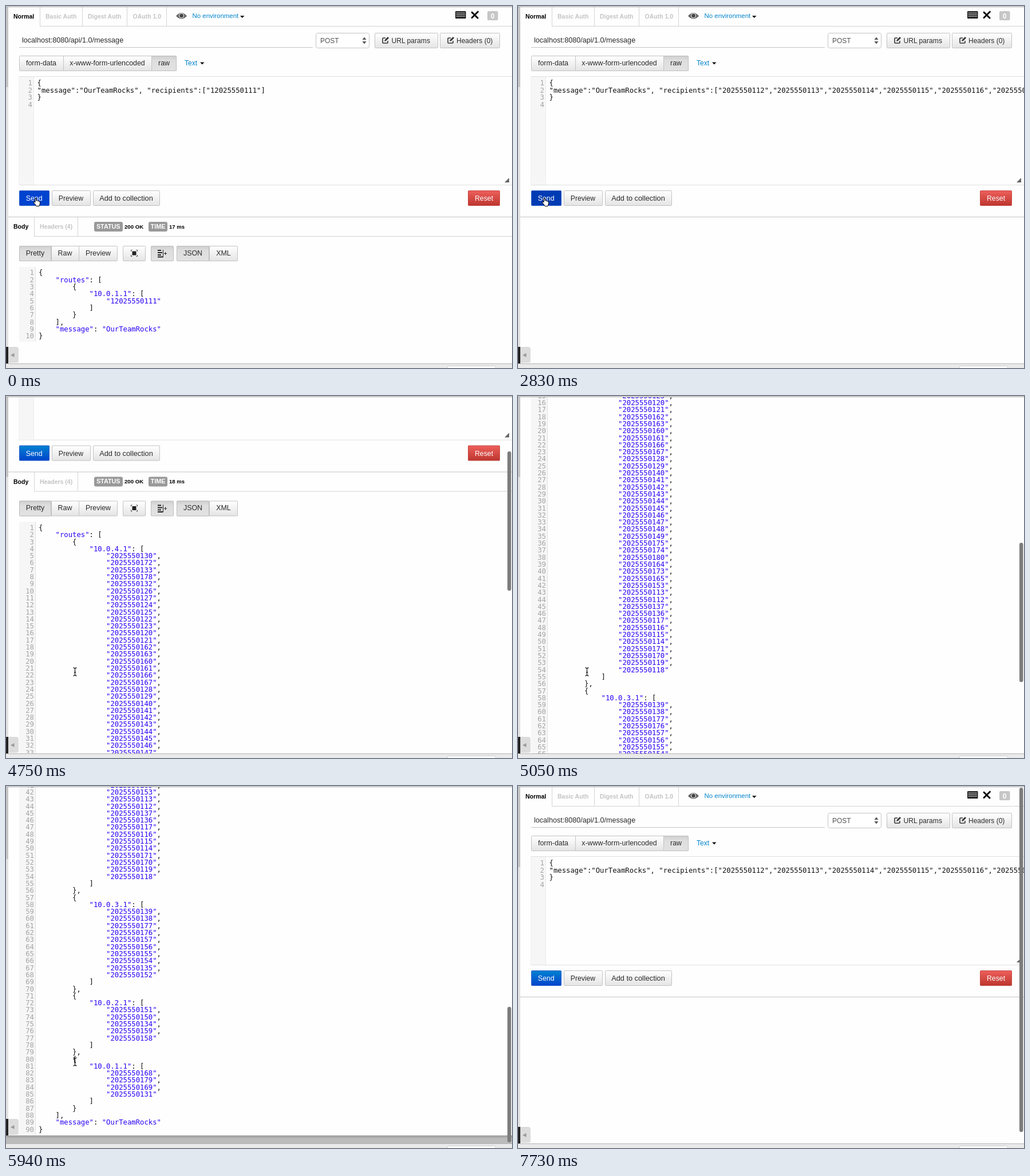
Write an HTML page that moves like this. It is 884 px wide and 634 px high and loops after 8000 ms.

```html
<!DOCTYPE html>
<html lang="en">
<head>
<meta charset="utf-8">
<title>API client</title>
<style>
html, body { margin: 0; width: 100%; height: 100%; overflow: hidden; background: #fff; }
svg { display: block; width: 884px; height: 634px; }
text { font-family: "Liberation Sans", Arial, sans-serif; font-size: 12.4px; fill: #2b2b2b; }
.bold { font-weight: bold; font-size: 10.5px; fill: #000; }
.off { fill: #c4c4c4; }
.link { fill: #0084cc; }
.white { fill: #fff; }
.code { font-family: "DejaVu Sans Mono", monospace; font-size: 12.25px; fill: #111; white-space: pre; }
.num { fill: #a5a5a5; text-anchor: end; }
.str { fill: #2a00f5; }
.mid { text-anchor: middle; }
</style>
</head>
<body>
<svg viewBox="0 0 884 634">
  <defs>
    <linearGradient id="plain" x2="0" y2="1"><stop stop-color="#fff"/><stop offset="1" stop-color="#e4e4e4"/></linearGradient>
    <linearGradient id="down" x2="0" y2="1"><stop stop-color="#cfcfcf"/><stop offset=".3" stop-color="#dedede"/><stop offset="1" stop-color="#e2e2e2"/></linearGradient>
    <linearGradient id="blue" x2="0" y2="1"><stop stop-color="#0082d2"/><stop offset="1" stop-color="#0044cc"/></linearGradient>
    <linearGradient id="red" x2="0" y2="1"><stop stop-color="#ee5f5b"/><stop offset="1" stop-color="#bd362f"/></linearGradient>
    <linearGradient id="under" x2="0" y2="1"><stop stop-color="#999"/><stop offset=".4" stop-color="#bbb"/></linearGradient>
    <clipPath id="clip"><rect y="2" width="884" height="624"/></clipPath>
  </defs>
  <rect width="884" height="634" fill="#eaeaea"/>
  <rect y="1" width="884" height="1" fill="#a6a6a6"/>
  <g clip-path="url(#clip)">
    <rect id="strip" width="884" height="14" fill="url(#under)"/>
    <g id="frame">
      <rect y="2" width="884" height="624" fill="#fefefe"/>
      <g id="page"></g>
      <path d="M0 2h4v624H0z" fill="#e2e2e2"/>
      <path d="M0 2h4v140H0z" fill="#c6c6c6"/>
      <path d="M0 597h4v29H0z" fill="#222"/>
      <path d="M4 597h14q4 0 4 4v20q0 4-4 4H4z" fill="#dcdcdc"/>
      <path d="M8 611.5l6.500-3.500v7z" fill="#999"/>
    </g>
    <rect id="bar" x="876" width="6.500" rx="3.250" fill="#7c7c7c"/>
    <path id="hand" d="M4 9V2q1-1.600 2 0V6q2-1 2.500.5q2-.6 2.300.8q1.700-.3 1.700 1.500V11L11 15.500H6L4.500 13L1 9q0-1.500 1.500-1z" fill="#fff" stroke="#000"/>
    <path id="beam" d="M-3-7q3 0 3 2q0-2 3-2M0-5V5M-3 7q3 0 3-2q0 2 3 2M-1.500 1h3" fill="none" stroke="#222" stroke-width="1.300"/>
  </g>
  <path d="M0 626.500h884" stroke="#b5b5b5"/>
  <rect x="771.500" y="630.500" width="84" height="9" rx="2" fill="#fff" stroke="#ccc"/>
</svg>
<script>
const $ = id => document.getElementById(id);
const PHONE = "20255501", NOTE = "OurTeamRocks", ROW = 12.306, CHAR = 7.375, BOTTOM = 947;
const GROUPS = {
  "10.0.4.1": "30 72 33 78 32 26 27 24 25 22 23 20 21 62 63 60 61 66 67 28 29 40 41 42 43 44 45 46 47 48 49 75 74 80 64 73 65 53 13 12 37 36 17 16 15 14 71 70 19 18",
  "10.0.3.1": "39 38 77 76 57 56 55 54 35 52",
  "10.0.2.1": "51 50 34 59 58",
  "10.0.1.1": "68 79 69 31"
};
const BORDER = { plain: "#c2c2c2", down: "#bdbdbd", blue: "#1f5cc8", red: "#c24a44" };

// Markup helpers
const text = (x, y, s, cls = "", size) =>
  `<text x="${x}" y="${y}" class="${cls}"${size ? ` style="font-size:${size}px"` : ""}>${s}</text>`;
const box = (x, y, w, h, fill, more = "") => `<rect x="${x}" y="${y}" width="${w}" height="${h}" fill="${fill}" ${more}/>`;
const line = (d, color = "#d4d4d4") => `<path d="${d}" stroke="${color}" fill="none"/>`;
const shape = (d, fill = "#111") => `<path d="${d}" fill="${fill}"/>`;
const button = (x, r, y, fill = "plain", more = "") =>
  box(x + .5, y + .5, r - x - 1, 26, `url(#${fill})`, `stroke="${BORDER[fill]}" rx="1" ${more}`);
const caret = (x, y) => shape(`M${x} ${y}h7.500l-3.750 4z`);
const edit = x => `<path d="M${x + 6} 56h-4q-1 0-1 1v7q0 1 1 1h7q1 0 1-1v-3" fill="none" stroke="#333" stroke-width="1.600"/>
  <path d="M${x + 4} 62l1-3 5-5 2 2-5 5z" fill="#333"/>`;
const group = (y, edges, labels, on) => button(edges[0], edges.at(-1), y, "plain") + labels.map((s, i) =>
  (i === on ? button(edges[i], edges[i + 1], y, "down") : "") +
  (i ? line(`M${edges[i] + .5} ${y + 1}v25`, "#c4c4c4") : "") +
  text((edges[i] + edges[i + 1]) / 2, y + 16.5, s, "mid")).join("");

function header() {
  let keys = "";
  for (let r = 0; r < 3; r++) for (let c = 0; c < 7; c++) keys += `M${787 + c * 2.2} ${11.5 + r * 3}h1.200v1.500h-1.200z`;
  return line("M59 35.500H884M59.500 2V35M133.500 2V35M211.500 2V35M280.500 2V35") +
    text(13, 21.5, "Normal", "bold") + text(69, 21.5, "Basic Auth", "bold off") +
    text(143, 21.5, "Digest Auth", "bold off") + text(221.5, 21.5, "OAuth 1.0", "bold off") +
    shape("M297 17.500q9.500-11 19 0q-9.500 10-19 0z", "#666") +
    '<circle cx="306.500" cy="17" r="4" fill="#444" stroke="#fff"/>' +
    text(325.5, 21, "No environment", "link", 11.45) + caret(409, 17) +
    box(785, 9, 18.5, 13, "#222", 'rx="1"') + shape(keys, "#fff") +
    '<path d="M814 11L824 21M824.500 10L814 20.500" stroke="#111" stroke-width="3" stroke-linecap="round"/>' +
    box(841, 9, 18.5, 16, "#c6c6c6", 'rx="2"') + text(850.2, 21.5, "0", "bold white mid", 12) +
    text(28, 63.5, "localhost:8080/api/1.0/message", "", 12.6) + line("M23 72.500H536", "#c4c4c4") +
    box(541.5, 47.5, 93, 26, "#fff", 'rx="3" stroke="#c4c4c4"') +
    `<text x="549" y="64.500" style="fill:#555;font-size:12px">POST</text>` +
    shape("M622.500 59l3.500-4.500 3.500 4.500zM622.500 62h7l-3.500 4.500z", "#555") +
    button(644, 755, 47) + edit(657) + text(673.5, 64.5, "URL params", "", 12.1) +
    button(758, 863, 47) + edit(771) + text(787, 64.5, "Headers (0)", "", 12) +
    group(87, [23, 100, 254, 298], ["form-data", "x-www-form-urlencoded", "raw"], 2) +
    text(312, 103.5, "Text", "link", 12.1) + caret(339, 98.5);
}

function editor() {
  const list = [12, 13, 14, 15, 16, 17, 18].map(n => `"${PHONE}${n}"`).join(",");
  const body = p => `"message":"${NOTE}", "recipients":[${p}]`;
  const y = i => 139.3 + i * 12.4;
  return box(23, 123.5, 880, 190, "#fefefe", 'stroke="#e0e0e0"') + box(23, 124, 26, 189, "#f6f6f6") +
    line("M48.500 124V313", "#ebebeb") +
    [1, 2, 3, 4].map((n, i) => text(46, y(i), n, "code num")).join("") +
    text(54.5, y(0), "{", "code") + text(54.5, y(2), "}", "code") +
    `<g id="one">${text(54.5, y(1), body(`"1${PHONE}11"`), "code")}</g>` +
    `<g id="many">${text(54.5, y(1), body(list), "code")}</g>` +
    shape("M871 309l8-8v8z", "#666") +
    button(23, 76, 323, "blue", 'id="send"') + text(49.2, 341, "Send", "white mid", 12.3) +
    button(80, 148, 323) + text(113.5, 341, "Preview", "mid", 12.2) +
    button(152, 269, 323) + text(210, 341, "Add to collection", "mid", 12.75) +
    button(807, 863, 323, "red") + text(835, 341, "Reset", "white mid", 12.3) +
    line("M4 369.500H884", "#c4c4c4");
}

// Pretty-printed JSON, one [indent, text] pair per row
function rows(groups) {
  const out = [[0, "{"], [4, '"routes": [']], names = Object.keys(groups);
  names.forEach((ip, i) => {
    out.push([8, "{"], [12, `"${ip}": [`]);
    groups[ip].forEach((n, j, all) => out.push([16, `"${n}"${j < all.length - 1 ? "," : ""}`]));
    out.push([12, "]"], [8, i < names.length - 1 ? "}," : "}"]);
  });
  return out.concat([[4, "],"], [4, `"message": "${NOTE}"`], [0, "}"]]);
}

function response(id, time, groups) {
  const all = rows(groups);
  const code = all.map(([indent, s], i) => {
    const y = 471.4 + i * ROW;
    return text(49, y, i + 1, "code num") +
      text(57 + indent * CHAR, y, s.replace(/"[^"]*"/g, '<tspan class="str">$&</tspan>'), "code");
  }).join("");
  return `<g id="${id}">` +
    line("M49 403.500H884M49.500 370V403M125.500 370V403") +
    text(13, 390, "Body", "bold") + text(59, 390, "Headers (4)", "bold off") +
    box(154, 378, 50, 17, "#999", 'rx="3"') + text(178.7, 389.5, "STATUS", "bold white mid", 10.8) +
    text(207, 389.5, "200 OK", "bold", 9.6) +
    box(249, 378, 33, 17, "#999", 'rx="3"') + text(265.5, 389.5, "TIME", "bold white mid", 10.9) +
    text(285, 389.5, time + " ms", "bold", 9.5) +
    group(420, [23, 79, 127, 195], ["Pretty", "Raw", "Preview"], 0) +
    button(204, 244, 420) + box(220.5, 429.5, 7, 7, "#222") +
    line("M218.500 430v-2.500h2M227.500 427.500h2v2.500M229.500 436v2.500h-2M220.500 438.500h-2v-2.500", "#444") +
    button(253, 293, 420, "down") +
    '<path d="M265 428h6M265 432h8M265 436h6M265 439.500h9" stroke="#222" stroke-width="1.800"/>' +
    line("M274.500 427v13M276 433.500h5M278.500 431v5", "#222") +
    group(420, [298, 355, 405], ["JSON", "XML"], 0) +
    box(23, 457, 29, all.length * ROW + 8, "#f6f6f6") +
    line(`M51.500 457v${all.length * ROW + 8}`, "#e2e2e2") + code + "</g>";
}

const phones = {};
for (const ip in GROUPS) phones[ip] = GROUPS[ip].split(" ").map(n => PHONE + n);
$("page").innerHTML = header() + editor() +
  response("short", 17, { "10.0.1.1": [`1${PHONE}11`] }) + response("long", 18, phones);

// Held values: [start ms, value...]
const SCROLL = [[0, 0], [4750, 236.5], [4900, 470], [5050, 640], [5200, 770], [5350, 874.4], [5500, 959],
  [5650, 948], [5940, 961], [6090, 954], [6240, 948], [6380, BOTTOM], [7730, 0]];
const CURSOR = [[0, "hand", 47, 335], [1800], [2240, "hand", -11, 265], [2390, "hand", 47, 356],
  [2530, "hand", 55, 361], [2680, "hand", 41, 335], [3570, "hand", 38, 332],
  [4310, "beam", 110, 457], [4460, "beam", 120.5, 483], [7730]];
const SEND = [[0, "#0043cf"], [900, "#003bb3"], [1800, "url(#blue)"], [2390, "#0043cf"], [2830, "#003bb3"],
  [3430, "#0043cf"], [4460, "url(#blue)"]];
const at = (track, t) => track.findLast(k => k[0] <= t).slice(1);
const show = (id, on) => $(id).setAttribute("visibility", on ? "visible" : "hidden");
const move = (id, x, y) => $(id).setAttribute("transform", `translate(${x} ${y})`);

function draw(t) {
  const [pos] = at(SCROLL, t), scroll = Math.min(pos, BOTTOM), over = pos - scroll;
  move("page", 0, -scroll);
  move("frame", 0, -over);
  move("strip", 0, 626 - over);

  const top = 3 + scroll * .397 + over * .55;
  $("bar").setAttribute("y", top);
  $("bar").setAttribute("height", t >= 7730 ? 603 : Math.min(244, 624 - top));
  show("bar", t >= 4750 && t < 6530 || t >= 7730);

  show("one", t < 1800);
  show("many", t >= 1800);
  show("short", t < 1800);
  show("long", t >= 3570 && t < 7730);
  $("send").setAttribute("fill", at(SEND, t)[0]);

  const [kind, x, y] = at(CURSOR, t);
  for (const id of ["hand", "beam"]) {
    show(id, id === kind);
    if (id === kind) move(id, x, y);
  }
}

const start = performance.now();
function tick(now) {
  draw(Math.max(0, now - start) % 8000);
  requestAnimationFrame(tick);
}
draw(0);
requestAnimationFrame(tick);
</script>
</body>
</html>
```
